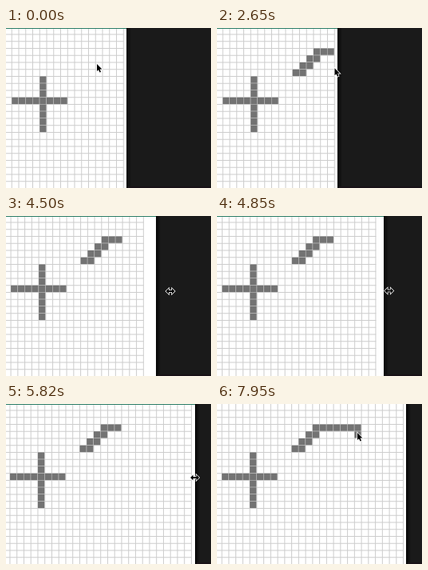
These frames come from a looping animation (257 px wide and 200 px high, 7990 ms). An HTML page with a canvas:

```html
<!DOCTYPE html>
<html lang="en">
<head>
<meta charset="utf-8">
<title>Resizable grid</title>
<style>
  html, body { margin: 0; width: 100%; height: 100%; overflow: hidden; background: #fff; }
  canvas { display: block; }
</style>
</head>
<body>
<canvas width="257" height="200"></canvas>
<script>
const ctx = document.querySelector('canvas').getContext('2d');
const LOOP = 7990, PITCH = 8.75, TOP = 7.5;
const DRAG_START = 3790, DRAG_END = 6090, RELEASE = 6370;

// Pointer moves: start time, end time, destination x, y
const moves = [
  [20, 100, 101, 54], [250, 370, 97, 57],
  [600, 1370, 134, 30], [1400, 1790, 146, 31],
  [2470, 3120, 151.4, 100],
  [DRAG_START, 4500, 206, 94], [4500, 5170, 224.5, 93], [5170, 5480, 236.6, 92],
  [RELEASE, 7090, 149, 32],
  [7600, 7900, 173, 32], [7900, 7950, 176, 36]
];
const strokes = [[310, 2470], [7350, LOOP]];

const arrow = new Path2D('M0 0v9l2-1.8 1.5 3.3 1.5-.6-1.4-3.3h2.8z');
const resizer = new Path2D('M-5.5 0l3.5-3.5v2.5h4v-2.5l3.5 3.5-3.5 3.5v-2.5h-4v2.5z');

const clamp = (v, lo, hi) => Math.min(Math.max(v, lo), hi);

function pointer(t) {
  let x = 114, y = 45;
  for (const [start, end, toX, toY] of moves) {
    const u = clamp((t - start) / (end - start), 0, 1);
    x += (toX - x) * u;
    y += (toY - y) * u;
    if (u < 1) break;
  }
  return [x, y];
}

// The divider and the grid follow the dragged pointer with a delay
const dragX = t => pointer(clamp(t, DRAG_START, DRAG_END))[0];

// The grid is centred in its width, so its left side shifts by half the remainder
function layout(t) {
  const width = dragX(t - 400) - 1.1;
  const half = (width - 144) % PITCH / 2;
  return { left: 3.6 + half, right: width - half - .4 };
}

function rect(color, x, y, w, h) {
  ctx.fillStyle = color;
  ctx.fillRect(x, y, w, h);
}

function liveCells(t) {
  const cells = new Set();
  for (let i = 0; i < 8; i++) cells.add(i + ',9').add('4,' + (i + 6));
  for (const [start, end] of strokes) {
    const { left } = layout(start);
    for (let s = start; s <= Math.min(t, end); s += 5) {
      const [x, y] = pointer(s);
      cells.add(Math.floor((x - left) / PITCH) + ',' + Math.floor((y - TOP) / PITCH));
    }
  }
  return cells;
}

function drawCursor(shape, x, y) {
  ctx.save();
  ctx.translate(x, y);
  ctx.lineWidth = 1.5;
  ctx.strokeStyle = '#fff';
  ctx.stroke(shape);
  ctx.fillStyle = '#000';
  ctx.fill(shape);
  ctx.restore();
}

function draw(t) {
  const { left, right } = layout(t);
  const edge = Math.round(dragX(t - 230));
  const pressed = strokes.some(([a, b]) => t >= a && t < b);

  rect('#fff', 0, 0, 257, 200);
  for (let x = left - PITCH; x < right + 1; x += PITCH) rect('#cdcdcd', x, 0, 1, 200);
  for (let y = TOP - PITCH; y < 200; y += PITCH) rect('#cdcdcd', 0, y, right + 1, 1);
  for (const cell of liveCells(t)) {
    const [c, r] = cell.split(',');
    rect('#737373', left + c * PITCH + .5, TOP + r * PITCH + .5, PITCH - .5, PITCH - .5);
  }
  if (!pressed) rect('#2a7d66', 0, 0, edge, 1);

  const shade = ctx.createLinearGradient(edge, 0, edge + 6, 0);
  shade.addColorStop(0, '#050505');
  shade.addColorStop(1, '#1a1a1a');
  rect(shade, edge, 0, 257 - edge, 200);
  rect('#181217', edge + 2, 198, 257 - edge, 2);

  drawCursor(t >= 3060 && t < RELEASE ? resizer : arrow, ...pointer(t));
}

const begin = performance.now();
function tick() {
  draw((performance.now() - begin) % LOOP);
  requestAnimationFrame(tick);
}
tick();
</script>
</body>
</html>
```
